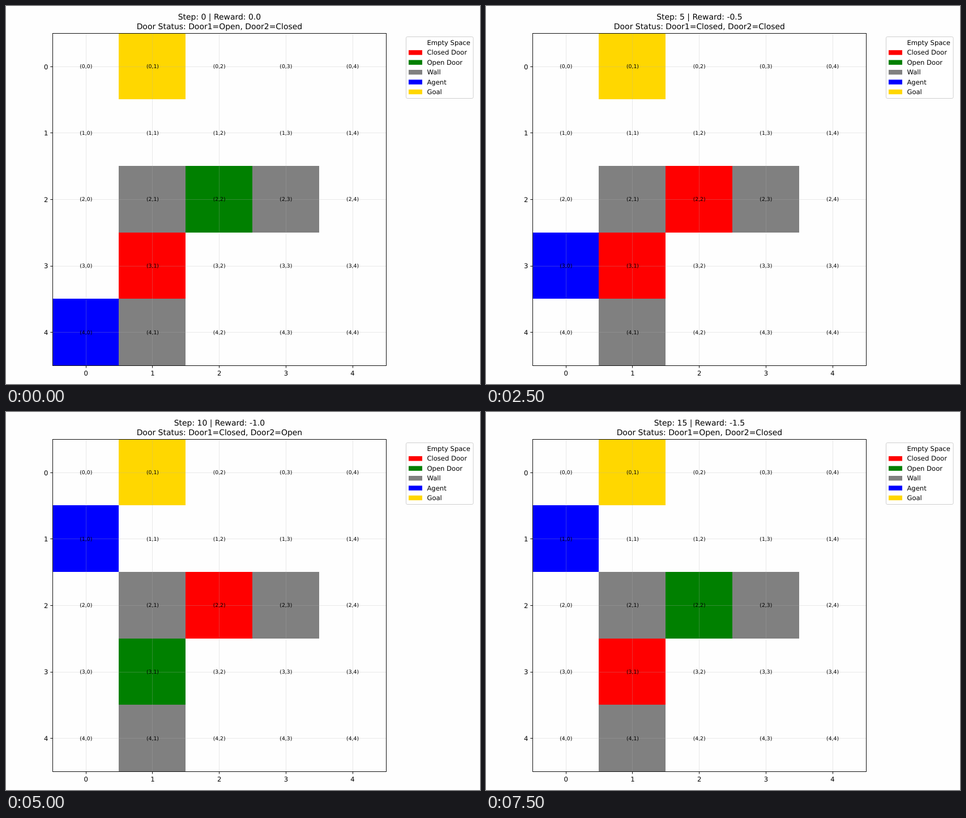
Recreate the animation shown at these times as an HTML page. Size 837 by 669 pixels, loop 8 s.

```html
<!DOCTYPE html>
<html lang="en">
<head>
<meta charset="utf-8">
<title>Door grid</title>
<style>
  html, body { margin: 0; width: 100%; height: 100%; overflow: hidden; background: #fefefe; }
  svg { display: block; }
  text { font-family: "DejaVu Sans", Verdana, sans-serif; text-rendering: geometricPrecision; }
</style>
</head>
<body>
<svg id="stage" width="837" height="669" viewBox="0 0 837 669"></svg>
<script>
const STEP_MS = 500;
const AGENT_ROWS = "4343432222100001"; // the agent stays in column 0
const DOOR1 = "OCCCCCOCOCCOCOCO";
const DOOR2 = "CCCCCCCCCCOCCCCC";
const COLORS = { closed: "red", open: "green", wall: "gray", agent: "blue", goal: "gold" };
const BOX = { left: 82.4, top: 48.5, right: 671.4, bottom: 636.5 };
const SIZE = 117.7;

const stage = document.getElementById("stage");

function add(tag, attrs, content) {
  const node = document.createElementNS("http://www.w3.org/2000/svg", tag);
  for (const key in attrs) node.setAttribute(key, attrs[key]);
  if (content) node.textContent = content;
  stage.appendChild(node);
  return node;
}

const label = (x, y, size, content, anchor = "middle") =>
  add("text", { x, y, "font-size": size, "text-anchor": anchor }, content);

const line = (x1, y1, x2, y2, stroke, opacity = 1) =>
  add("line", { x1, y1, x2, y2, stroke, "stroke-width": 0.93, "stroke-opacity": opacity });

const edgeX = col => Math.floor(82 + 117.75 * col);
const edgeY = row => Math.round(47.8 + 117.6 * row);
const midX = col => BOX.left + SIZE * (col + 0.5);
const midY = row => BOX.top + 117.6 * (row + 0.5);

function place(rect, row, col) {
  const x = edgeX(col), y = edgeY(row);
  rect.setAttribute("x", x);
  rect.setAttribute("y", y);
  rect.setAttribute("width", edgeX(col + 1) - x);
  rect.setAttribute("height", edgeY(row + 1) - y);
}

function cell(row, col, fill) {
  const rect = add("rect", { fill, "shape-rendering": "crispEdges" });
  place(rect, row, col);
  return rect;
}

cell(0, 1, COLORS.goal);
cell(2, 1, COLORS.wall);
cell(2, 3, COLORS.wall);
cell(4, 1, COLORS.wall);
const door1 = cell(2, 2, COLORS.open);
const door2 = cell(3, 1, COLORS.closed);
const agent = cell(4, 0, COLORS.agent);

// Grid lines, ticks and tick labels
for (let i = 0; i < 5; i++) {
  const x = Math.floor(midX(i)) + 0.5, y = Math.floor(midY(i)) + 0.5;
  line(x, BOX.top, x, BOX.bottom, "#b0b0b0", 0.3);
  line(BOX.left, y, BOX.right, y, "#b0b0b0", 0.3);
  line(x, BOX.bottom, x, BOX.bottom + 4.1, "black");
  line(BOX.left - 4.1, y, BOX.left, y, "black");
  label(midX(i), 654, 11.62, String(i));
  label(74.5, midY(i) + 4.3, 11.62, String(i), "end");
}

add("rect", {
  x: 82.5, y: 48.5, width: 589, height: 588,
  fill: "none", stroke: "black", "stroke-width": 0.93
});

for (let row = 0; row < 5; row++)
  for (let col = 0; col < 5; col++)
    label(midX(col), midY(row) + 2.9, 9.3, `(${row},${col})`);

// Legend
add("rect", {
  x: 706.5, y: 54.5, width: 118.6, height: 109, rx: 2.3,
  fill: "white", stroke: "#ccc", "stroke-width": 0.93
});
[
  ["Empty Space", "white"],
  ["Closed Door", COLORS.closed],
  ["Open Door", COLORS.open],
  ["Wall", COLORS.wall],
  ["Agent", COLORS.agent],
  ["Goal", COLORS.goal]
].forEach(([name, fill], i) => {
  const y = 64.9 + 17.4 * i;
  add("rect", { x: 711, y: y - 4.1, width: 24, height: 8.4, fill });
  label(743.4, y + 4.1, 11.62, name, "start");
});

const heading = label(376.9, 24, 13.95, "");
const status = label(376.9, 41.4, 13.95, "");

const word = state => state === "O" ? "Open" : "Closed";
let shown = -1;

function show(step) {
  if (step === shown) return;
  shown = step;
  const first = word(DOOR1[step]), second = word(DOOR2[step]);
  const reward = (step ? "-" : "") + (step / 10).toFixed(1);
  heading.textContent = `Step: ${step} | Reward: ${reward}`;
  status.textContent = `Door Status: Door1=${first}, Door2=${second}`;
  door1.setAttribute("fill", COLORS[first.toLowerCase()]);
  door2.setAttribute("fill", COLORS[second.toLowerCase()]);
  place(agent, Number(AGENT_ROWS[step]), 0);
}

const start = performance.now();
function tick() {
  const elapsed = Math.max(0, performance.now() - start);
  show(Math.floor(elapsed / STEP_MS) % AGENT_ROWS.length);
  requestAnimationFrame(tick);
}
tick();
</script>
</body>
</html>
```
